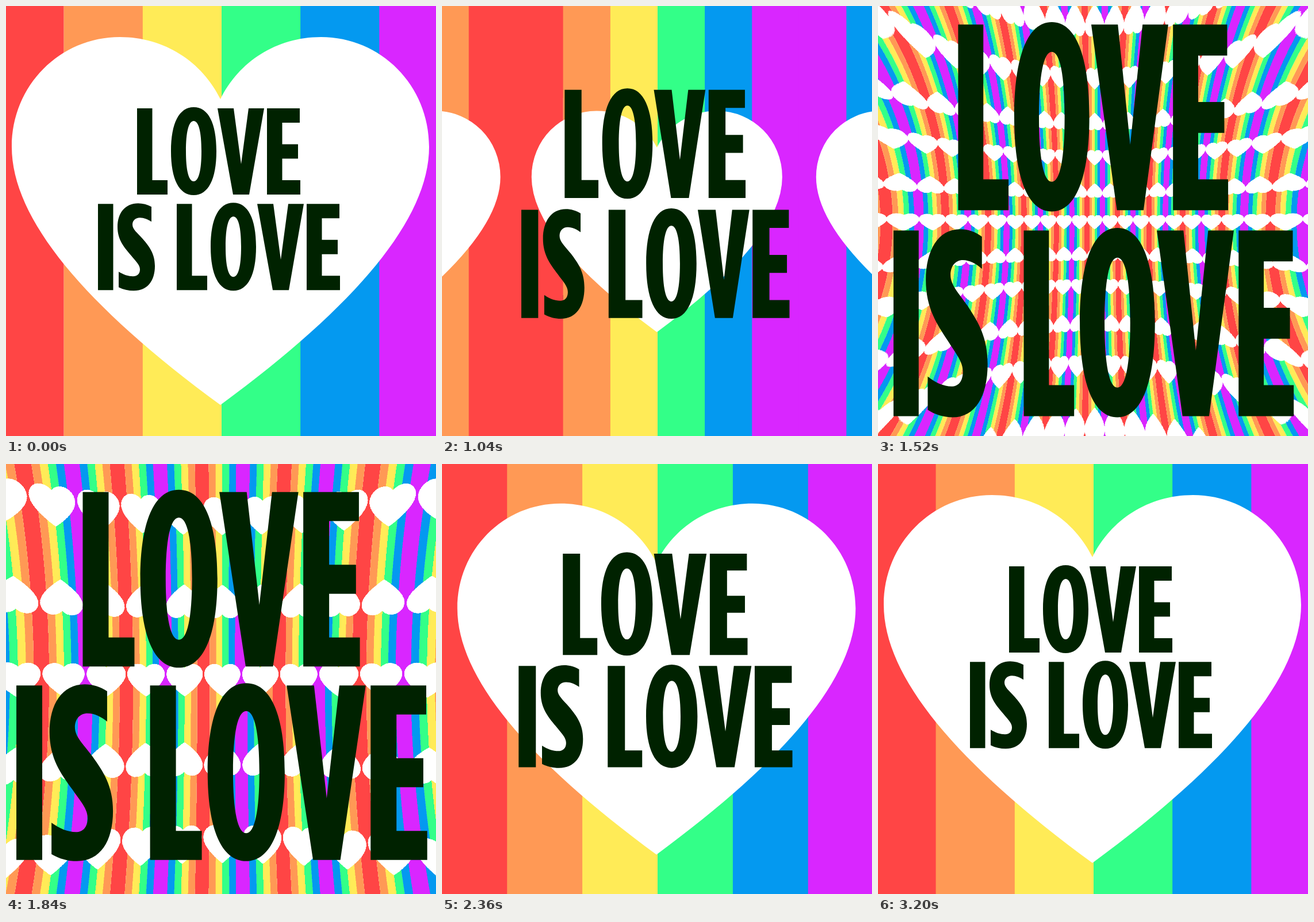
An HTML page with a canvas that plays this animation: 748 px wide and 748 px high, repeating every 3.24 s.

```html
<!DOCTYPE html>
<html lang="en">
<head>
<meta charset="utf-8">
<title>Love is love</title>
<style>
html, body { margin: 0; width: 100%; height: 100%; overflow: hidden; background: #fff; }
canvas { display: block; width: 748px; height: 748px; }
</style>
</head>
<body>
<canvas id="stage" width="748" height="748" role="img" aria-label="LOVE IS LOVE"></canvas>
<script>
const SIZE = 748, LOOP = 3240, STEP = 40;
const CX = 375, CY = 376;
const TILE_W = 823, RATIO = 2.06, TILE_H = TILE_W * RATIO;
const STRIPES = ['#ff4545', '#ff9955', '#ffeb57', '#33ff88', '#0499f0', '#d926ff'];

const ctx = stage.getContext('2d');
const texture = document.createElement('canvas');
const tex = texture.getContext('2d', { willReadFrequently: true });
const image = ctx.createImageData(SIZE, SIZE);
const pixels = new Uint32Array(image.data.buffer);

const heart = new Path2D(`M373 162 C405 97 470 54 548 54 C652 54 736 138 736 245
  C736 370 610 520 373 694 C136 520 10 370 10 245 C10 138 94 54 198 54 C276 54 341 97 373 162Z`);

// Letters share one cap height, stem and bar thickness; y runs from 0 to CAP.
const CAP = 150, STEM = 26.5, BAR = 25;
const love = new Path2D(), is = new Path2D();

// A negative rx reverses the direction and so cuts a counter.
function oval(path, x, y, rx, ry) {
  const k = .36;
  path.moveTo(x, y - ry);
  for (const [sx, sy] of [[1, 1], [-1, -1]]) {
    path.bezierCurveTo(x + sx * rx * (1 - k), y - sy * ry, x + sx * rx, y - sy * ry * (1 - k), x + sx * rx, y);
    path.bezierCurveTo(x + sx * rx, y + sy * ry * (1 - k), x + sx * rx * (1 - k), y + sy * ry, x, y + sy * ry);
  }
  path.closePath();
}

love.rect(228, 0, STEM, CAP);
love.rect(228, CAP - BAR, 53, BAR);
oval(love, 326.5, 74.5, 39.5, 76.5);
oval(love, 326.5, 74.5, -13.5, 52.5);
love.addPath(new Path2D('M368 0H396L409 97L422 0H449L423 150H395Z'));
love.rect(454, 0, STEM, CAP);
[57, 54, 58].forEach((width, i) => love.rect(454, i * (CAP - BAR) / 2, width, BAR));
is.rect(160, 0, STEM, CAP);
is.addPath(new Path2D(`M253 5 C246 1 238 -1 230 -1 C207 -1 194 16 194 40 C194 63 206 76 217 89
  C226 100 233 106 233 114 C233 122 228 126 221 126 C213 126 204 123 196 118 V145
  C204 149 213 151 222 151 C246 151 259 134 259 108 C259 86 249 74 238 61
  C228 50 220 44 220 36 C220 29 225 24 233 24 C240 24 247 27 253 31Z`));

// Bell-shaped swell from 0 to 1 and back, with its own rise and fall time.
const bump = (t, peak, rise, fall) =>
  Math.exp(-(t < peak ? ((peak - t) / rise) ** 2.33 : ((t - peak) / fall) ** 2.17));

// One tile around the origin, slightly oversized so neighbours leave no seam.
function drawTile(c, depth) {
  const w = TILE_W / 6;
  STRIPES.forEach((color, i) => {
    c.fillStyle = color;
    c.fillRect((i - 3) * w - (i ? 0 : 2), -TILE_H / 2 - 2, w + 2, TILE_H + 4);
  });
  c.translate(-CX, -CY);
  c.fillStyle = c.strokeStyle = '#fff';
  c.lineJoin = 'round';
  c.fill(heart);
  if (depth > .05) {                 // small hearts swell until they touch
    c.lineWidth = 120 * depth ** 2;
    c.stroke(heart);
  }
}

function drawFlat(width, depth) {
  const s = width / TILE_W;
  for (let j = -1; j <= 1; j++) {
    for (let i = -1; i <= 1; i++) {
      ctx.setTransform(i ? -s : s, 0, 0, j ? -s : s, CX + i * width, CY + j * width * RATIO);
      drawTile(ctx, depth);
    }
  }
}

const mirror = v => {
  const m = v - 2 * Math.floor(v / 2);
  return m > 1 ? 2 - m : m;
};

// Mirrored tiling seen through a lens that magnifies towards the corners.
function drawLens(width, depth) {
  const tw = Math.ceil(Math.min(500, width * 2.5)), th = Math.ceil(tw * RATIO);
  texture.width = tw;
  texture.height = th;
  tex.setTransform(tw / TILE_W, 0, 0, th / TILE_H, tw / 2, th / 2);
  drawTile(tex, depth);
  const source = new Uint32Array(tex.getImageData(0, 0, tw, th).data.buffer);

  const bend = 2.58e-6 * depth ** 4, cx = CX + 2 * depth, height = width * RATIO;
  for (let py = 0, n = 0; py < SIZE; py++) {
    const y = py + .5 - CY;
    for (let px = 0; px < SIZE; px++) {
      const x = px + .5 - cx, g = 1 / (1 + bend * (x * x + y * y));
      const u = mirror(x * g / width + .5), v = mirror(y * g / height + .5);
      pixels[n++] = source[Math.min(th - 1, v * th | 0) * tw + Math.min(tw - 1, u * tw | 0)];
    }
  }
  ctx.putImageData(image, 0, 0);
}

function drawText(sx, sy) {
  ctx.setTransform(sx, 0, 0, sy, 363.5 * (1 - sx), 304.3 * (1 - sy));
  ctx.fillStyle = '#002200';
  ctx.translate(0, 178);
  ctx.fill(love);
  ctx.translate(0, 166.3);
  ctx.fill(is);
  ctx.translate(69, 0);
  ctx.fill(love);
}

let shown = -1;
function frame(now) {
  const t = Math.floor(now % LOOP / STEP) * STEP;
  if (t !== shown) {
    shown = t;
    const depth = bump(t, 1610, 430, 382);
    const width = TILE_W * Math.exp(-3.53 * depth);
    (width < 450 ? drawLens : drawFlat)(width, depth);
    drawText(1 + .73 * bump(t, 1720, 515, 499), 1 + 1.18 * bump(t, 1615, 479, 553));
  }
  requestAnimationFrame(frame);
}
frame(0);
</script>
</body>
</html>
```
